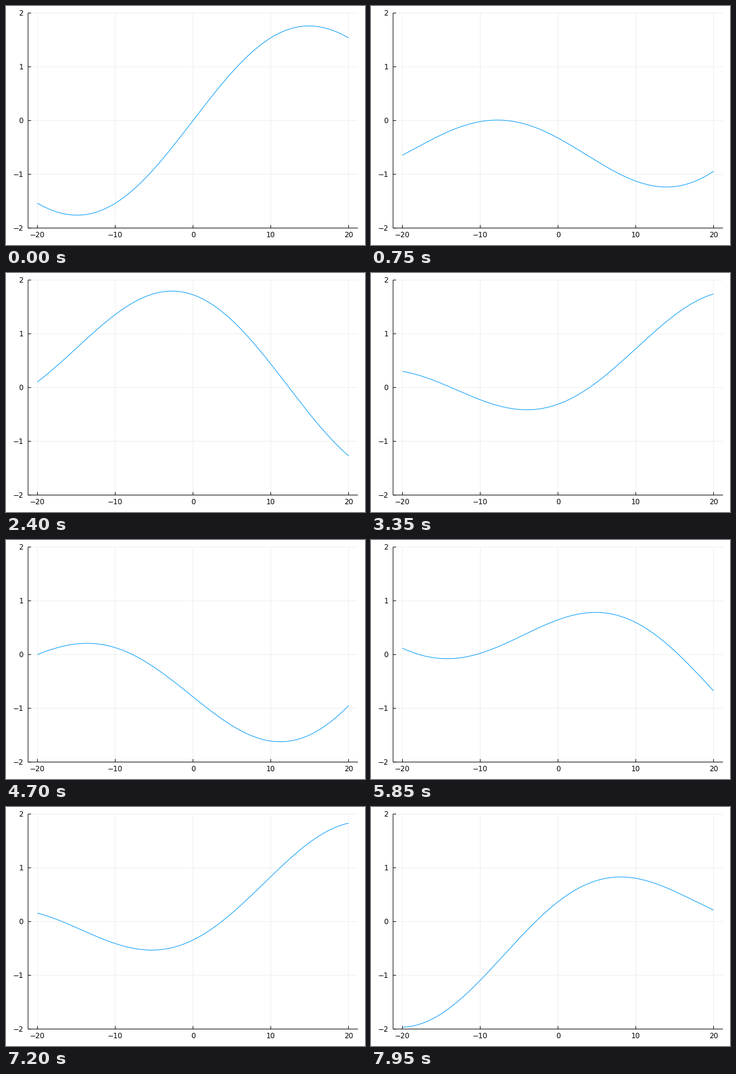
Write a matplotlib script that moves like this. It is 600 by 400 pixels and loops after 8000 ms.

```python
import numpy as np
import matplotlib.pyplot as plt
from matplotlib.animation import FuncAnimation

W, H, DPI = 600, 400, 100
PX = 72 / DPI                      # one pixel in points
FRAMES, INTERVAL = 160, 50
SPEED = 1.3121                     # wave travel per frame, in x units
LEFT, RIGHT, TOP, BOTTOM = 36.9, 588.19, 11.81, 371.65
X_LIM, Y_LIM = 21.2, 2
TICK = 5

plt.rcParams["font.family"] = "DejaVu Sans"


def to_px(x):
    return LEFT + (x + X_LIM) / (2 * X_LIM) * (RIGHT - LEFT)


def to_py(y):
    return BOTTOM - (y + Y_LIM) / (2 * Y_LIM) * (BOTTOM - TOP)


def wave(x, n):
    """Two waves of lengths 50 and 100 running in opposite directions."""
    shift = SPEED * n
    return np.sin(2 * np.pi * (x + shift) / 50) + np.sin(2 * np.pi * (x - shift) / 100)


fig = plt.figure(figsize=(W / DPI, H / DPI), dpi=DPI, facecolor="white")
ax = fig.add_axes([0, 0, 1, 1])
ax.set_xlim(0, W)
ax.set_ylim(H, 0)
ax.axis("off")


def rule(x0, y0, x1, y1, color, z):
    ax.plot([x0, x1], [y0, y1], color=color, lw=PX, zorder=z,
            solid_capstyle="butt", snap=False)


def label(x, y, value, align):
    ax.text(x, y, str(value).replace("-", "\u2212"), fontsize=12 * PX,
            ha=align, va="baseline", color="black")


for v in range(-20, 21, 10):
    x = to_px(v)
    rule(x, TOP, x, BOTTOM, "#eeeeee", 1)
    rule(x, BOTTOM, x, BOTTOM - TICK, "black", 3)
    label(x, 387, v, "center")

for v in range(-2, 3):
    y = to_py(v)
    rule(LEFT, y, RIGHT, y, "#eeeeee", 1)
    rule(LEFT, y, LEFT + TICK, y, "black", 3)
    label(29, y + 4.4, v, "right")

rule(LEFT, BOTTOM, RIGHT, BOTTOM, "black", 3)
rule(LEFT, TOP, LEFT, BOTTOM, "black", 3)

xs = np.linspace(-20, 20, 401)
curve, = ax.plot(to_px(xs), to_py(wave(xs, 0)), color="#009afa", lw=PX,
                 zorder=4, solid_capstyle="butt", snap=False)


def update(n):
    curve.set_ydata(to_py(wave(xs, n)))
    return curve,


anim = FuncAnimation(fig, update, frames=FRAMES, interval=INTERVAL,
                     repeat=True, repeat_delay=0)
plt.show()
```
